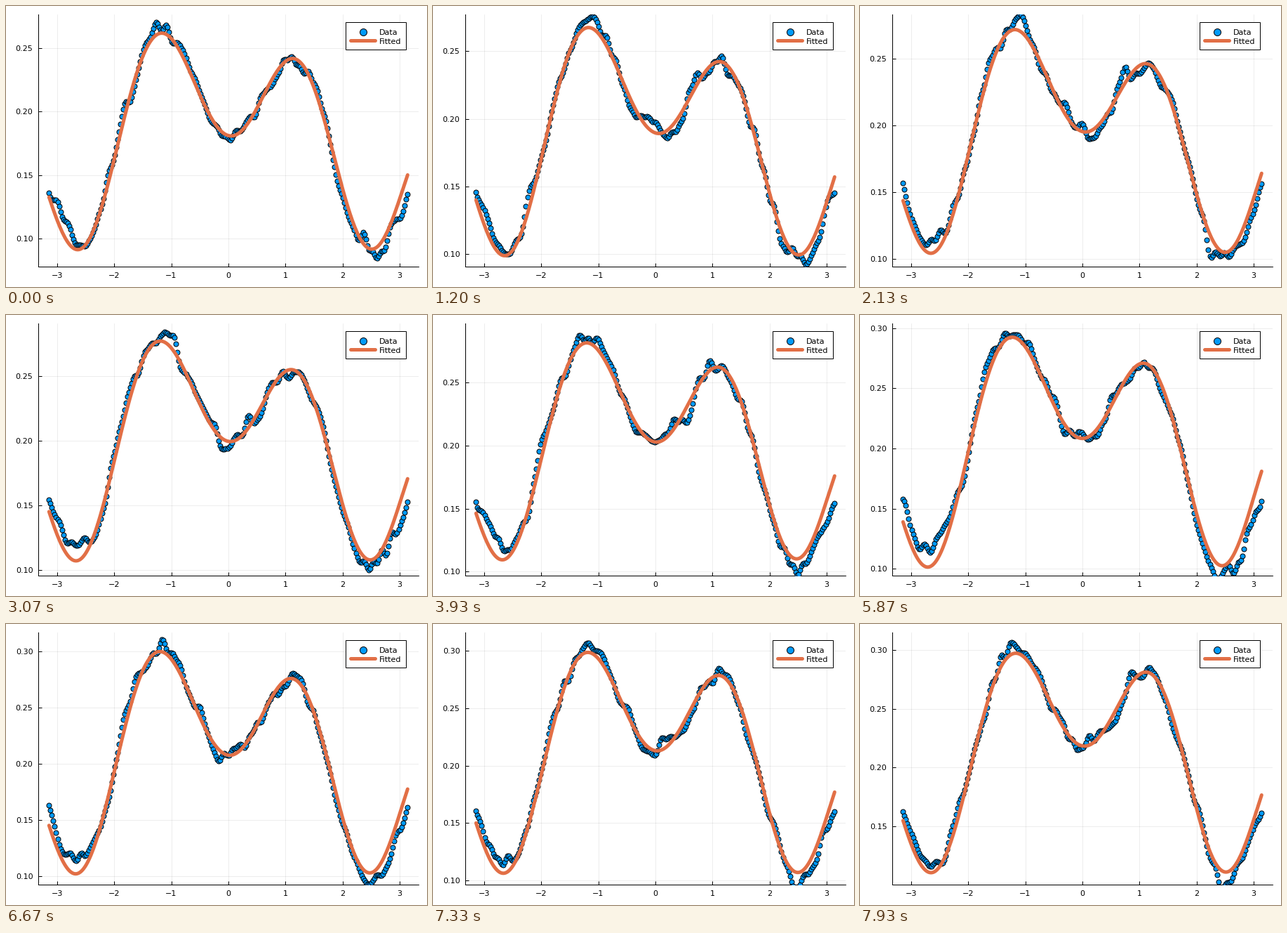
A matplotlib script for the animation above (8000 ms loop, 600 px wide and 400 px high).

```python
import numpy as np
import matplotlib.pyplot as plt
from matplotlib.animation import FuncAnimation
from matplotlib.patches import Rectangle
from matplotlib.ticker import FormatStrFormatter, MultipleLocator

W, H, DPI = 600, 400, 100
FRAMES, LOOP = 120, 8000
PX = 72 / DPI
BLUE, ORANGE = "#009AFA", "#E26F46"
FONT = 8
X = np.arange(-np.pi, np.pi, 0.025)
XFIT = np.linspace(-np.pi, np.pi, 300)

# Slow drift of the curve and of the visible range, at a few times in seconds
TIMES = [0, 1.2, 2.13, 3.93, 5.07, 6.67, 7.93]
DRIFT = {
    "valley": [0.0914, 0.0992, 0.1049, 0.1099, 0.1018, 0.1024, 0.1112],
    "peak": [0.2619, 0.2674, 0.2725, 0.2820, 0.2851, 0.3002, 0.2973],
    "dip": [0.1805, 0.1889, 0.1954, 0.2027, 0.2087, 0.2072, 0.2186],
    "shoulder": [0.2417, 0.2420, 0.2466, 0.2627, 0.2656, 0.2758, 0.2815],
    "centre": [-0.050, -0.050, -0.061, -0.085, -0.135, -0.080, -0.055],
    "bottom": [0.0779, 0.0909, 0.0944, 0.0968, 0.0961, 0.0923, 0.1008],
    "top": [0.2768, 0.2772, 0.2841, 0.2977, 0.2911, 0.3174, 0.3152],
}
# Valleys, peaks and dip relative to the centre
TURNS = np.array([-2.6, -1.095, 0.09, 1.15, 2.6])

# Rough ripple: drifting harmonics whose strength falls with frequency
rng = np.random.default_rng(4)
ORDER = np.arange(6, 46)
PHASE = rng.uniform(0, 2 * np.pi, ORDER.size)
SPEED = rng.normal(0, 2, ORDER.size)


def basis(x, slope=False):
    """Constant and four harmonics of a wave slightly longer than the range."""
    x = np.asarray(x)
    cols = [np.zeros_like(x) if slope else np.ones_like(x)]
    for w in 0.85 * np.arange(1, 5):
        c, s = np.cos(w * x), np.sin(w * x)
        cols += [-w * s, w * c] if slope else [c, s]
    return np.column_stack(cols)


SLOPE_WEIGHT = 0.2


def fit_wave(p):
    """Smooth wave through the turning points, flat at each of them."""
    turns = p["centre"] + TURNS
    size = p["peak"] - p["valley"]
    left = p["valley"] + size * (turns[0] + np.pi) ** 2
    right = p["valley"] + size * (np.pi - turns[-1]) ** 2
    heights = [left, p["valley"], p["peak"], p["dip"],
               p["shoulder"], p["valley"], right]
    a = np.vstack([basis([-np.pi, *turns, np.pi]),
                   SLOPE_WEIGHT * basis(turns, slope=True)])
    return np.linalg.lstsq(a, np.append(heights, np.zeros(5)), rcond=None)[0]


def state(t):
    p = {name: np.interp(t, TIMES, row) for name, row in DRIFT.items()}
    wave = fit_wave(p)
    fitted = basis(XFIT) @ wave
    data = basis(X) @ wave
    # The data is periodic, so its two ends meet halfway
    data -= 0.5 * (fitted[-1] - fitted[0]) * (X / np.pi) ** 3
    data += 0.005 * np.exp(-((X - p["centre"] - TURNS[1]) / 0.35) ** 2)
    angle = np.outer(X, ORDER) + PHASE + SPEED * t
    data += 0.014 * np.sin(angle) @ (1 / ORDER)
    return data, fitted, (p["bottom"], p["top"])


plt.rcParams["font.family"] = "DejaVu Sans"
fig = plt.figure(figsize=(W / DPI, H / DPI), dpi=DPI, facecolor="white")
ax = fig.add_axes([46 / W, 29 / H, 541.7 / W, 359.3 / H])
ax.set_xlim(-np.pi * 1.06, np.pi * 1.06)
ax.spines[["top", "right"]].set_visible(False)
ax.spines[["left", "bottom"]].set_linewidth(PX)
ax.xaxis.set_major_locator(MultipleLocator(1))
ax.yaxis.set_major_locator(MultipleLocator(0.05))
ax.yaxis.set_major_formatter(FormatStrFormatter("%.2f"))
ax.tick_params(direction="in", length=5 * PX, width=PX, labelsize=FONT)
ax.tick_params(axis="x", pad=8 * PX)
ax.tick_params(axis="y", pad=7.5 * PX)
ax.grid(color="black", alpha=0.1, linewidth=0.5)
ax.set_axisbelow(True)

dot = dict(marker="o", ls="", mfc=BLUE, mec="black", mew=PX)
stroke = dict(color=ORANGE, lw=5 * PX, solid_capstyle="round")
dots, = ax.plot([], [], ms=7 * PX, zorder=3, **dot)
curve, = ax.plot([], [], zorder=4, **stroke)

# Legend, laid out in stage pixels
key = fig.add_axes([0, 0, 1, 1])
key.set(xlim=(0, W), ylim=(H, 0))
key.axis("off")
key.add_patch(Rectangle((484, 23), 86, 39, fc="white", ec="black", lw=PX))
key.plot([508.5], [36.5], ms=10 * PX, **dot)
key.plot([491, 526], [49.2, 49.2], **stroke)
for y, label in ((41, "Data"), (54, "Fitted")):
    key.text(532, y, label, size=FONT, va="baseline")


def draw(n):
    data, fitted, limits = state(n * LOOP / FRAMES / 1000)
    dots.set_data(X, data)
    curve.set_data(XFIT, fitted)
    ax.set_ylim(*limits)
    return dots, curve


anim = FuncAnimation(fig, draw, frames=FRAMES, interval=LOOP / FRAMES,
                     repeat=True, repeat_delay=0, blit=False)
plt.show()
```
